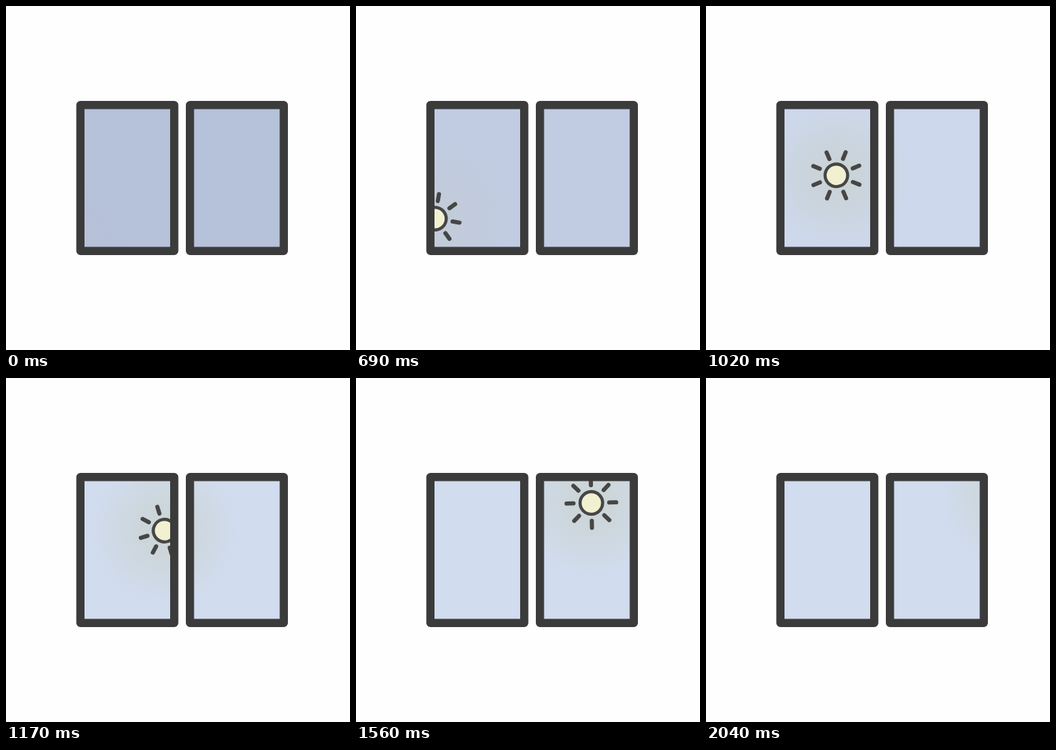
These frames come from a looping animation (482x482 px, 2.49 s). An HTML page with a canvas:

```html
<!DOCTYPE html>
<html lang="en">
<head>
<meta charset="utf-8">
<title>Sun behind the window</title>
<style>
  html, body { margin: 0; width: 100%; height: 100%; overflow: hidden; background: #fefefe; }
  canvas { display: block; width: 100vmin; height: 100vmin; }
</style>
</head>
<body>
<canvas id="stage" width="482" height="482"></canvas>
<script>
const SIZE = 482;
const LOOP = 2490, STEP = 30, START = 420, END = 2040, DAYLIGHT = 1110;
const PANES = [110, 263.5].map(x => ({ x, y: 144.5, w: 120, h: 193 }));
const FRAME = 11.5;
const ORBIT = { x: 419, y: 591, r: 425.4 };
const DUSK = [182, 193, 218], DAY = [209, 220, 239];
const INK = '#464646';
const RAD = Math.PI / 180;

const ctx = document.getElementById('stage').getContext('2d');
const clamp = (v, lo, hi) => Math.min(hi, Math.max(lo, v));
const mix = (a, b, k) => a + (b - a) * k;

// The sun swings on a large circle, in degrees left of the vertical.
const swing = t => 28.39 - 34 * Math.sin(1.218 * (t - 1150) / 1000);

function drawGlow(strength) {
  const glow = ctx.createRadialGradient(0, 0, 0, 0, 0, 105);
  const tone = a => `rgba(195, 200, 172, ${a * strength})`;
  glow.addColorStop(0, tone(0.38));
  glow.addColorStop(0.2, tone(0.36));
  glow.addColorStop(1, tone(0));
  ctx.fillStyle = glow;
  ctx.fillRect(-105, -105, 210, 210);
}

function drawSun() {
  ctx.strokeStyle = INK;
  ctx.lineCap = 'round';
  ctx.lineWidth = 5.8;
  for (let i = 0; i < 8; i++) {
    const a = i * Math.PI / 4;
    const dx = Math.sin(a), dy = -Math.cos(a);
    ctx.beginPath();
    ctx.moveTo(25 * dx, 25 * dy);
    ctx.lineTo(34.8 * dx, 34.8 * dy);
    ctx.stroke();
  }
  ctx.beginPath();
  ctx.arc(0, 0, 15.8, 0, 2 * Math.PI);
  ctx.fillStyle = '#f1f1d2';
  ctx.fill();
  ctx.lineWidth = 4.4;
  ctx.stroke();
}

function draw(t) {
  const day = clamp((t - START) / (DAYLIGHT - START), 0, 1);
  const angle = swing(t);

  ctx.fillStyle = '#fefefe';
  ctx.fillRect(0, 0, SIZE, SIZE);

  ctx.save();
  ctx.beginPath();
  for (const p of PANES) ctx.rect(p.x - 1, p.y - 1, p.w + 2, p.h + 2);
  ctx.clip();
  ctx.fillStyle = `rgb(${DUSK.map((c, i) => Math.round(mix(c, DAY[i], day)))})`;
  ctx.fillRect(0, 0, SIZE, SIZE);
  ctx.translate(ORBIT.x - ORBIT.r * Math.sin(angle * RAD),
                ORBIT.y - ORBIT.r * Math.cos(angle * RAD));
  ctx.rotate((10.7 - angle) * RAD);
  drawGlow(mix(0.15, 1, day));
  drawSun();
  ctx.restore();

  ctx.strokeStyle = '#3b3b3b';
  ctx.lineWidth = FRAME;
  ctx.lineJoin = 'round';
  for (const p of PANES) {
    ctx.strokeRect(p.x - FRAME / 2, p.y - FRAME / 2, p.w + FRAME, p.h + FRAME);
  }
}

const origin = performance.now();
function tick() {
  const t = (performance.now() - origin) % LOOP;
  draw(clamp(Math.floor(t / STEP) * STEP, START, END));
  requestAnimationFrame(tick);
}
tick();
</script>
</body>
</html>
```
